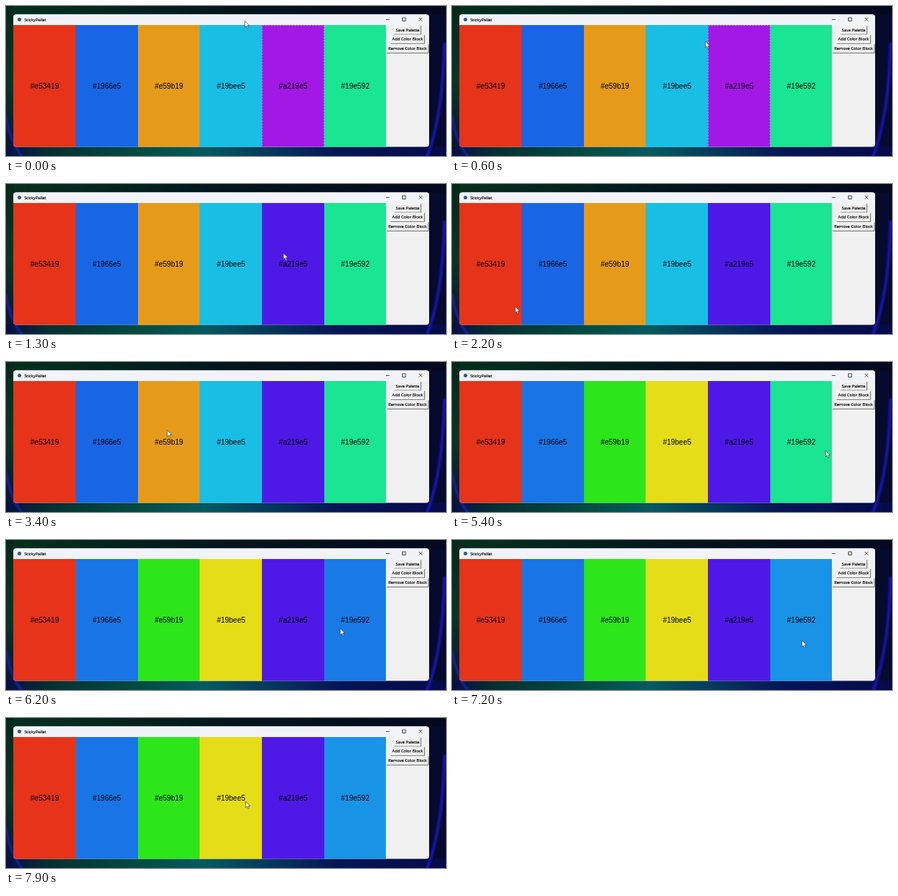
Animation, 600 px wide and 205 px high, one loop 8 s. Source, as an HTML page:

```html
<!DOCTYPE html>
<html lang="en">
<head>
<meta charset="utf-8">
<title>StickyPallet</title>
<style>
  html, body { margin: 0; width: 100%; height: 100%; overflow: hidden; background: #030a1b; }
  svg { display: block; }
  .ui { font: 5.7px "Open Sans", "Noto Sans", sans-serif; fill: #000; stroke: #000; stroke-width: .15; }
  .hex { font: 10px "Liberation Sans", Arial, sans-serif; fill: #000; }
  .hex, .button { text-anchor: middle; }
  .glow { fill: none; filter: blur(1px); }
</style>
</head>
<body>
<svg id="stage" width="600" height="205" viewBox="0 0 600 205">
  <defs>
    <linearGradient id="top">
      <stop offset="0" stop-color="#06301f"/><stop offset=".2" stop-color="#04271d"/>
      <stop offset=".5" stop-color="#03161d"/><stop offset="1" stop-color="#05081f"/>
    </linearGradient>
    <linearGradient id="left" x2="0" y2="1">
      <stop offset="0" stop-color="#05281b"/><stop offset=".5" stop-color="#063726"/>
      <stop offset="1" stop-color="#051238"/>
    </linearGradient>
    <linearGradient id="bottom">
      <stop offset="0" stop-color="#061045"/><stop offset=".1" stop-color="#043033"/>
      <stop offset=".3" stop-color="#054b42"/><stop offset=".45" stop-color="#055a60"/>
      <stop offset=".75" stop-color="#061656"/><stop offset="1" stop-color="#060a48"/>
    </linearGradient>
    <clipPath id="frame"><rect x="10" y="11.5" width="567" height="181" rx="4"/></clipPath>
  </defs>

  <rect width="600" height="205" fill="#060a2c"/>
  <rect width="600" height="12" fill="url(#top)"/>
  <rect width="11" height="205" fill="url(#left)"/>
  <rect y="192" width="600" height="13" fill="url(#bottom)"/>
  <path class="glow" d="M0 150Q5 185 22 206" stroke="#1822a8" stroke-width="3"/>
  <path class="glow" d="M598 50Q596 150 574 206" stroke="#1a16b0" stroke-width="4"/>

  <g clip-path="url(#frame)">
    <rect x="10" y="11" width="567" height="182" fill="#f0f0f0"/>
    <rect x="10" y="11" width="567" height="15" fill="#f2f3f8"/>
    <g id="blocks" shape-rendering="crispEdges"></g>
    <rect id="focus" x="349.5" y="26.5" width="84" height="166" fill="none" stroke="#ddd" stroke-dasharray="2" opacity=".5"/>
  </g>
  <circle cx="18.3" cy="18.5" r="2.5" fill="#2d5d8c"/>
  <text class="ui" x="25" y="20.6">StickyPallet</text>
  <path d="M518 18.5h5M540.5 16h4.5v4.5h-4.5zM563 16l4.6 4.6m0-4.6l-4.6 4.6" fill="none" stroke="#222" stroke-width=".8"/>
  <g id="buttons"></g>
  <path id="cursor" d="M0 0V8.6L2 6.8L3.4 10L4.8 9.4L3.4 6.2H6.1Z" fill="#fff" stroke="#222" stroke-width=".6"/>
</svg>
<script>
const LOOP = 8000, STEP = 100, BLOCK_W = 84.7;
const $ = id => document.getElementById(id);

function add(parent, tag, attrs, text = '') {
  const el = document.createElementNS('http://www.w3.org/2000/svg', tag);
  for (const name in attrs) el.setAttribute(name, attrs[name]);
  el.textContent = text;
  return parent.appendChild(el);
}

const labels = ['#e53419', '#1966e5', '#e59b19', '#19bee5', '#a219e5', '#19e592'];
const edge = i => Math.round(10.2 + i * BLOCK_W);
const blocks = labels.map((hex, i) => {
  const x = edge(i), width = edge(i + 1) - x;
  const block = add($('blocks'), 'rect', { x, y: 26, width, height: 167 });
  add($('blocks'), 'text', { x: 10.4 + (i + .5) * BLOCK_W, y: 113, class: 'hex' }, hex);
  return block;
});

['Save Palette', 'Add Color Block', 'Remove Color Block'].forEach((caption, i) => {
  const center = 547.6, y = 27 + i * 12.6, bottom = y + 12;
  const text = add($('buttons'), 'text', { x: center, y: y + 7.6, class: 'ui button' }, caption);
  const width = text.getComputedTextLength() + 4.2, x = center - width / 2;
  const face = add($('buttons'), 'rect', { x, y, width, height: 12, fill: '#f0f0f0', stroke: '#fff', 'stroke-width': .6 });
  text.before(face);
  add($('buttons'), 'path', { d: `M${x} ${bottom}h${width}V${y}`, fill: 'none', stroke: '#555', 'stroke-width': .9 });
});

// Pointer stops: [arrival, x, y, pause]
const stops = [
  [0, 325.8, 20.5], [1300, 378.3, 94.5, 200], [2400, 44, 178, 300], [3100, 236, 92],
  [4000, 133, 100], [4500, 310.3, 102], [4800, 316, 112], [5400, 509.3, 121, 300],
  [6200, 455.8, 121, 200], [7300, 478, 138], [7900, 326.8, 114]
];

// Each click gives a block a new hue: [time, block, hue]
const clicks = [
  [1200, 4, 255.3], [3500, 2, 114.7], [4000, 1, 213.2],
  [4700, 3, 57.4], [5600, 5, 211.5], [7000, 5, 204.4]
];

function pointerAt(t) {
  const i = stops.findLastIndex(stop => stop[0] <= t);
  const [arrival, x, y, pause = 100] = stops[i];
  const [end, nextX, nextY] = stops[i + 1] || [LOOP, x, y];
  const start = arrival + pause;
  const p = t > start ? (t - start) / (end - start) : 0;
  const ease = p * p * (3 - 2 * p);
  return [x + (nextX - x) * ease, y + (nextY - y) * ease];
}

function draw() {
  const t = Math.floor(performance.now() % LOOP / STEP) * STEP;
  $('cursor').setAttribute('transform', `translate(${pointerAt(t)})`);

  const colors = [...labels];
  for (const [time, i, hue] of clicks) if (t >= time) colors[i] = `hsl(${hue}, 80%, 50%)`;
  blocks.forEach((block, i) => block.setAttribute('fill', colors[i]));
  $('focus').style.display = t < clicks[0][0] ? '' : 'none';
  requestAnimationFrame(draw);
}

draw();
</script>
</body>
</html>
```
